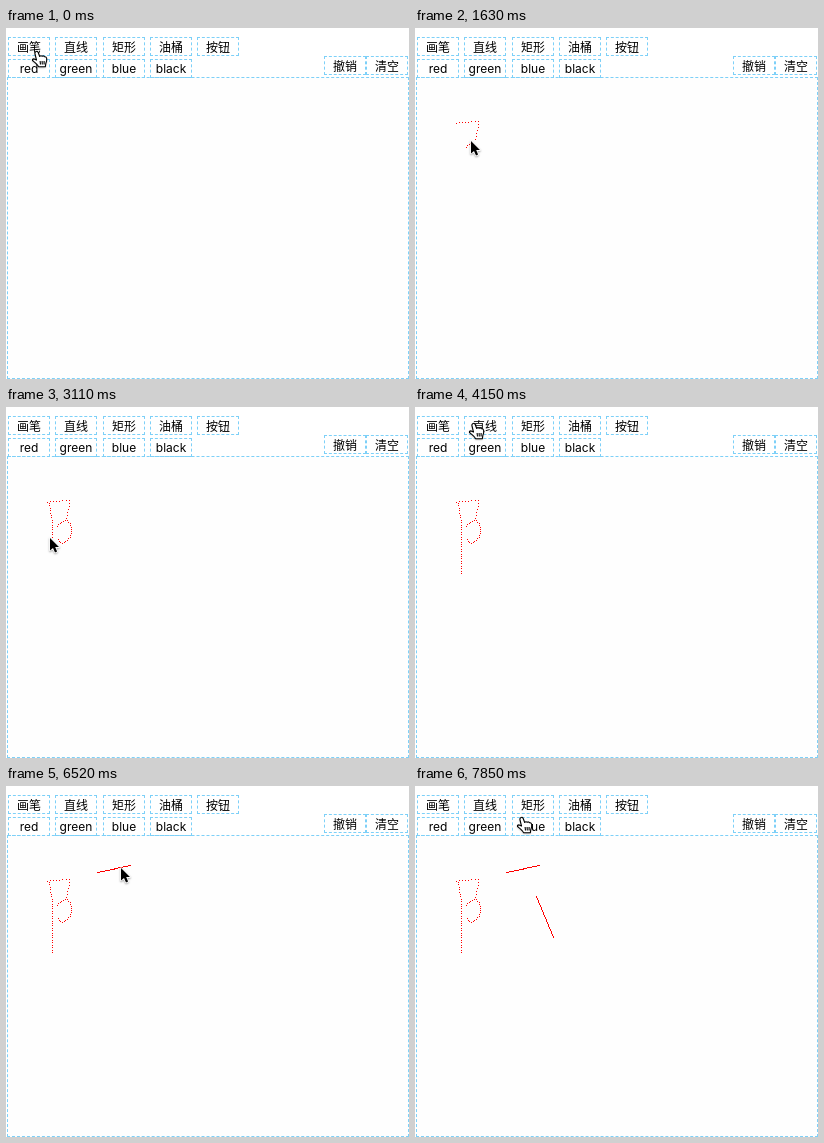
An HTML page with a canvas for the animation above (8000 ms loop, 403 px wide and 351 px high).

```html
<!DOCTYPE html>
<html lang="zh">
<head>
<meta charset="utf-8">
<style>
  html, body { margin: 0; width: 100%; height: 100%; overflow: hidden; background: #fff; }
  body { position: relative; font: 12px/17px Inter, "Noto Sans CJK SC", "Noto Sans CJK", sans-serif; color: #000; }
  .button, .board { position: absolute; box-sizing: border-box; border: 1px dashed #7dd0f8; }
  .button { width: 42px; height: 19px; text-align: center; white-space: nowrap; }
  .button span { position: relative; top: .5px; }
  .button:lang(en) span { top: -.5px; }
  .board { left: 1px; top: 49px; width: 402px; height: 302px; background: #fefefe; }
  canvas { position: absolute; left: 0; top: 0; }
</style>
</head>
<body>
<div class="board"></div>
<canvas width="403" height="351"></canvas>
<script>
const DURATION = 8000;
const TICKS = 54;
const canvas = document.querySelector('canvas');
const ctx = canvas.getContext('2d');

function addRow(lang, labels, left, top, pitch) {
  labels.split(' ').forEach((label, i) => {
    const button = document.createElement('div');
    button.className = 'button';
    button.lang = lang;
    button.style.left = Math.round(left + i * pitch) + 'px';
    button.style.top = top + 'px';
    const text = document.createElement('span');
    text.textContent = label;
    button.append(text);
    document.body.insertBefore(button, canvas);
  });
}
addRow('zh', '画笔 直线 矩形 油桶 按钮', 2, 9, 47.3);
addRow('en', 'red green blue black', 2, 31, 47.3);
addRow('zh', '撤销 清空', 318, 28, 42);

// A gesture carries the pointer along a path between two ticks.
function gesture(start, end, d, ease = p => p) {
  const path = document.createElementNS('http://www.w3.org/2000/svg', 'path');
  path.setAttribute('d', d);
  const length = path.getTotalLength();
  return { start, end, length, ease, dots: [], at: p => path.getPointAtLength(length * p) };
}

const move = (start, end, d) => gesture(start, end, d, p => p * p * (3 - 2 * p));

// Leaves dots behind the pointer.
function brush(start, end, d, spacing) {
  const stroke = gesture(start, end, d);
  const count = Math.round(stroke.length / spacing);
  for (let i = 0; i <= count; i++) {
    const { x, y } = stroke.at(i / count);
    stroke.dots.push({ x: Math.round(x), y: Math.round(y), tick: start + (end - start) * i / count });
  }
  return stroke;
}

// The whole line appears when the button is released.
function line(start, end, d, release) {
  const stroke = brush(start, end, d, 1);
  for (const dot of stroke.dots) dot.tick = release;
  return stroke;
}

const gestures = [
  move(2, 6, 'M34 27Q33 60 41 95'),
  brush(6, 9, 'M41 95L46 94L63 93V98L60 111', 3),
  move(9, 10, 'M60 111L51 119'),
  brush(10, 15, 'M51 119C54 115 57 113 60 113C64 114 65 120 65 124C65 130 61 134 56 136Q53 136 52 132', 2),
  move(16, 19, 'M52 132L43 96'),
  brush(19, 23, 'M43 96L46 116V166', 2.4),
  move(24, 28, 'M46 166Q58 90 62 20'),
  move(33, 36, 'M62 20L91 86'),
  line(37, 39, 'M91 86L124 79', 41),
  move(41, 46, 'M124 79Q107 20 121 110'),
  line(47, 49, 'M121 110L138 151', 51),
  move(50, 53, 'M138 151L110 35')
];
const dots = gestures.flatMap(g => g.dots);

const arrow = new Path2D('M1 1.5V14L4 11.4L6 16L8.1 15.1L6.2 10.6H10Z');
const hand = new Path2D('M4.2 1.2Q5.8 .2 6.6 1.8L8.2 6Q9.5 4.6 10.7 5.8Q12 4.8 13 6.3Q14.8 6 15.2 8Q15.5 10.5 14.3 13L13.8 16.3H7.2Q5.5 13.5 3 11.6L1 10Q.6 8.3 2.6 8.4L5 9.6L3.4 3Q3.2 1.8 4.2 1.2Z');
const knuckles = new Path2D('M8.6 10.5L9 14M10.6 10.5L10.8 14M12.6 10.5V14');

function drawPointer({ x, y }) {
  const overButtons = y < 48;
  ctx.save();
  ctx.lineJoin = 'round';
  ctx.shadowColor = 'rgba(0,0,0,.35)';
  ctx.shadowBlur = 2;
  ctx.shadowOffsetY = 1;
  if (overButtons) {
    ctx.translate(Math.round(x) - 8.5, Math.round(y) - 4.5);
    ctx.fillStyle = '#fff';
    ctx.fill(hand);
    ctx.shadowColor = 'transparent';
    ctx.lineWidth = 1.1;
    ctx.stroke(hand);
    ctx.stroke(knuckles);
  } else {
    ctx.translate(Math.round(x) - 3, Math.round(y) - 1.5);
    ctx.strokeStyle = '#fff';
    ctx.lineWidth = 1.6;
    ctx.stroke(arrow);
    ctx.shadowColor = 'transparent';
    ctx.fill(arrow);
  }
  ctx.restore();
}

function draw() {
  // The small lead keeps ticks from landing late.
  const tick = Math.floor((performance.now() + 9) % DURATION / DURATION * TICKS);
  ctx.clearRect(0, 0, canvas.width, canvas.height);
  ctx.fillStyle = '#f00';
  for (const dot of dots) {
    if (dot.tick <= tick) ctx.fillRect(dot.x, dot.y, 1, 1);
  }
  ctx.fillStyle = '#000';
  const current = gestures.findLast(g => g.start <= tick) ?? gestures[0];
  const progress = (tick - current.start) / (current.end - current.start);
  drawPointer(current.at(current.ease(Math.min(1, Math.max(0, progress)))));
  requestAnimationFrame(draw);
}
draw();
</script>
</body>
</html>
```
